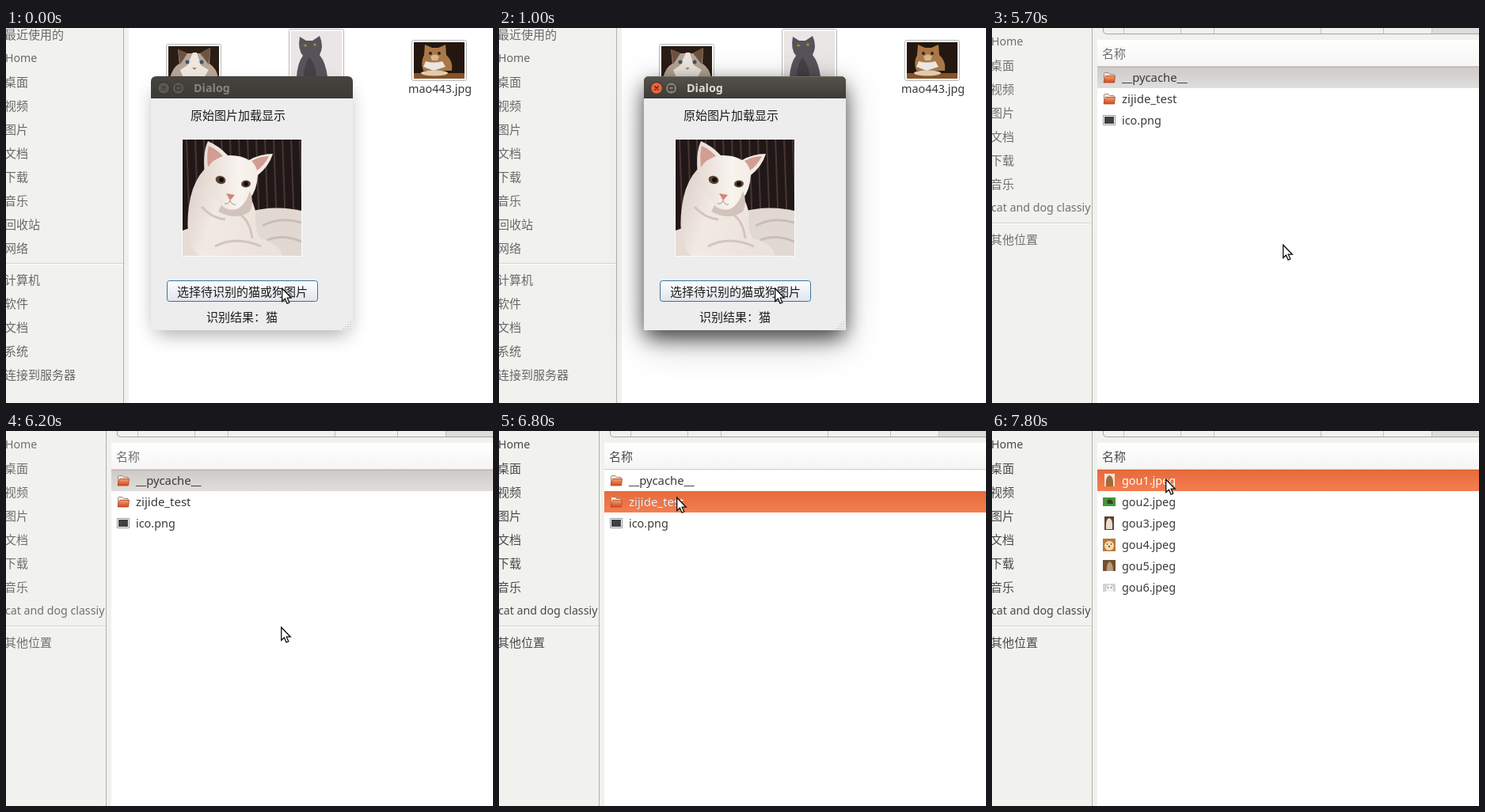
These frames come from a looping animation (615x474 px, 8000 ms). An HTML page:

```html
<!DOCTYPE html>
<html lang="zh-CN">
<head>
<meta charset="utf-8">
<title>Dialog</title>
<style>
html, body { margin: 0; width: 100%; height: 100%; overflow: hidden; background: #fff; }
svg { display: block; width: 615px; height: 474px; }
text {
  font: 14.4px "Noto Sans", "Noto Sans CJK SC", "Noto Sans CJK", sans-serif;
  fill: #3a3a3a;
}
.zh text, text.zh { font-size: 15px; }
.zh .la { font-size: 14.2px; }
.dim text { fill: #686868; }
.ink text { fill: #1c1c1c; }
text.title { font-weight: 700; font-size: 14.3px; }
.near { filter: blur(13px); }
.far { filter: blur(25px); }

.t { animation: 8s step-end infinite; }
.desktop { animation-name: desktop; }
.chooser { animation-name: chooser; }
.focus { animation-name: focus; }
.depth { animation-name: depth; }
.answer { animation-name: answer; }
.tone text { animation: tone 8s step-end infinite; }
.root { animation-name: root; }
.idle { animation-name: idle; }
.pick { animation-name: pick; }
.hot { animation-name: hot; }
.pets { animation-name: pets; }
.dogs { animation-name: dogs; }
.cursor { animation-name: cursor; }

@keyframes desktop { 0% { opacity: 1 } 71.25%, 100% { opacity: 0 } }
@keyframes chooser { 0% { opacity: 0 } 71.25%, 100% { opacity: 1 } }
@keyframes focus { 0% { opacity: 0 } 11.25%, 100% { opacity: 1 } }
@keyframes depth { 0% { opacity: 0 } 11.25% { opacity: .5 } 12.5%, 100% { opacity: 1 } }
@keyframes answer { 0% { opacity: 1 } 70%, 100% { opacity: 0 } }
@keyframes tone { 0% { fill: #707070 } 85%, 100% { fill: #4a4a4a } }
@keyframes root { 0% { opacity: 1 } 86.25%, 100% { opacity: 0 } }
@keyframes idle { 0% { opacity: 1 } 85%, 100% { opacity: 0 } }
@keyframes pick { 0% { opacity: 0 } 85% { opacity: 1 } 86.25%, 100% { opacity: 0 } }
@keyframes hot { 0% { opacity: 0 } 86.25%, 100% { opacity: 1 } }
@keyframes pets { 0% { opacity: 0 } 86.25% { opacity: 1 } 97.5%, 100% { opacity: 0 } }
@keyframes dogs { 0% { opacity: 0 } 97.5%, 100% { opacity: 1 } }
@keyframes cursor {
  0% { transform: translate(348px, 328px) }
  70% { transform: translate(359px, 306px) }
  71.25% { transform: translate(367px, 273px) }
  76.25% { transform: translate(361px, 265px) }
  77.5% { transform: translate(347px, 247px) }
  78.75% { transform: translate(325px, 217px) }
  80% { transform: translate(298px, 181px) }
  81.25% { transform: translate(266px, 139px) }
  82.5% { transform: translate(238px, 101px) }
  83.75% { transform: translate(224px, 83px) }
  91.25% { transform: translate(223px, 77px) }
  92.5% { transform: translate(221px, 68px) }
  93.75%, 100% { transform: translate(219px, 60px) }
}
</style>
</head>
<body>
<svg viewBox="0 0 615 474">
  <defs>
    <linearGradient id="bar" x2="0" y2="1"><stop stop-color="#55534a"/><stop offset="1" stop-color="#3c3b37"/></linearGradient>
    <linearGradient id="barOff" x2="0" y2="1"><stop stop-color="#45443f"/><stop offset="1" stop-color="#3b3a36"/></linearGradient>
    <linearGradient id="btn" x2="0" y2="1"><stop stop-color="#fdfdfe"/><stop offset="1" stop-color="#dfe5ec"/></linearGradient>
    <linearGradient id="grey" x2="0" y2="1"><stop stop-color="#cdcac7"/><stop offset="1" stop-color="#e0dedc"/></linearGradient>
    <linearGradient id="orange" x2="0" y2="1"><stop stop-color="#e76a3a"/><stop offset="1" stop-color="#f37e51"/></linearGradient>
    <linearGradient id="head" x2="0" y2="1"><stop stop-color="#fff"/><stop offset="1" stop-color="#f6f5f4"/></linearGradient>
    <linearGradient id="fold" x2="0" y2="1"><stop stop-color="#f0a070"/><stop offset="1" stop-color="#d5481f"/></linearGradient>
    <linearGradient id="fur" x2="1" y2=".3"><stop stop-color="#d9cdc6"/><stop offset=".4" stop-color="#f1e9e3"/><stop offset="1" stop-color="#ece2dc"/></linearGradient>
    <linearGradient id="face"><stop stop-color="#e6dad3"/><stop offset=".5" stop-color="#f8f3ee"/><stop offset="1" stop-color="#f1e7e1"/></linearGradient>
    <pattern id="bars" width="11" height="150" patternUnits="userSpaceOnUse" patternTransform="translate(225 141) rotate(-2)">
      <path d="M3 0V150" stroke="#5e4b47" stroke-width="1.200"/>
    </pattern>
    <clipPath id="photo"><path d="M223 141h150v147H223z"/></clipPath>
    <g id="folder">
      <path d="M1.500 13V2.500q0-1 1-1H7l1.500 2H14V13z" fill="#f2e9e2" stroke="#a58472"/>
      <path d="M3.500 5.500h12l-1 8.500H1z" fill="url(#fold)" stroke="#b5451f" stroke-width=".8"/>
    </g>
  </defs>

  <g class="t desktop">
    <path d="M0 0h615v474H0z" fill="#fff"/>
    <path d="M0 0h155v474H0z" fill="#f1f1ee"/>
    <path d="M148.500 0V474" stroke="#b0b0ad"/>
    <path d="M0 297.500H148" stroke="#d3d3d0"/><path d="M0 298.500H148" stroke="#fff"/>
    <g class="zh dim">
      <text x="-2" y="13.500">最近使用的</text>
      <text x="-1" y="43" class="la">Home</text>
      <text x="-2" y="74">桌面</text>
      <text x="-2" y="104">视频</text>
      <text x="-2" y="134">图片</text>
      <text x="-2" y="164">文档</text>
      <text x="-2" y="194">下载</text>
      <text x="-2" y="224">音乐</text>
      <text x="-2" y="254">回收站</text>
      <text x="-2" y="284">网络</text>
      <text x="-2" y="324">计算机</text>
      <text x="-2" y="354">软件</text>
      <text x="-2" y="384">文档</text>
      <text x="-2" y="414">系统</text>
      <text x="-2" y="444">连接到服务器</text>
    </g>

    <g fill="#fff" stroke="#b9b9b9">
      <rect x="202.500" y="20.500" width="69" height="52" rx="2"/>
      <rect x="357.500" y="1.500" width="69" height="70" rx="2"/>
      <rect x="512.500" y="15.500" width="69" height="51" rx="2"/>
    </g>
    <path d="M205 23h64v40h-64z" fill="#2a1d16"/>
    <path d="M207 63q4-14 12-18l-2-18 12 5h16l13-7-1 20q9 6 11 18z" fill="#b7a595"/>
    <path d="M217 27l12 5-9 14zM258 25l-13 7 11 14z" fill="#6f5341"/>
    <path d="M236 31h5l5 16 10 6-6 10h-26l-4-10 9-6z" fill="#eee6df"/>
    <circle cx="229" cy="43" r="2.500" fill="#3f5568"/><circle cx="247" cy="43" r="2.500" fill="#3f5568"/>
    <path d="M235 50h6l-3 3z" fill="#b9817a"/>
    <path d="M360 4h64v58h-64z" fill="#e9e6e5"/>
    <path d="M367 62q1-18 8-27-7-8-4-24l8 5h8l9-6q6 13 0 24 8 10 10 28z" fill="#56545a"/>
    <path d="M376 62q0-15 7-25 9 10 9 25z" fill="#444247"/>
    <circle cx="378" cy="22" r="1.800" fill="#a8853d"/><circle cx="390" cy="21" r="1.800" fill="#a8853d"/>
    <path d="M515 18h64v46h-64z" fill="#23170f"/>
    <path d="M527 54q-4-10 1-20l1-13 9 4h8l9-4 1 13q9 8 7 20z" fill="#a97847"/>
    <path d="M530 42q10 3 21 0l4 7-15 5-13-5z" fill="#ebe6e0"/>
    <path d="M536 36q6-5 11 0l-2 5h-7z" fill="#d5b68e"/>
    <circle cx="536" cy="32" r="2" fill="#3b2312"/><circle cx="547" cy="32" r="2" fill="#3b2312"/>
    <path d="M515 57h64v7h-64z" fill="#855329"/>
    <ellipse cx="541" cy="57" rx="17" ry="3.500" fill="#decbb2"/>
    <text x="508" y="82">mao443.jpg</text>

    <rect class="near" x="189" y="78" width="243" height="308" rx="6" opacity=".36"/>
    <g class="t depth">
      <rect class="near" x="184" y="72" width="253" height="320" rx="6" opacity=".5"/>
      <rect class="far" x="184" y="72" width="253" height="326" rx="6" opacity=".22"/>
    </g>
    <path d="M183 89h255v293H183z" fill="#ededed"/>
    <path d="M183 89V68q0-7 7-7h241q7 0 7 7v21z" fill="url(#barOff)"/>
    <g fill="#5a5851" stroke="#33322e">
      <circle cx="199" cy="76" r="7.500"/><circle cx="217.500" cy="76" r="7.500"/>
    </g>
    <path d="M196.500 73.500l5 5m0-5l-5 5M214.500 73.500h6v5h-6z" fill="none" stroke="#373630" stroke-width="1.300"/>
    <text x="237" y="81" class="title" style="fill:#86837a">Dialog</text>
    <g class="t focus">
      <path d="M183 89V68q0-7 7-7h241q7 0 7 7v21z" fill="url(#bar)"/>
      <path d="M188 61.500H433" stroke="#6b695f"/>
      <circle cx="199" cy="76" r="7.500" fill="#ea6238" stroke="#33322e"/>
      <circle cx="217.500" cy="76" r="7.500" fill="#7b796f" stroke="#33322e"/>
      <path d="M196.500 73.500l5 5m0-5l-5 5M214.500 73.500h6v5h-6z" fill="none" stroke="#3c2b22" stroke-width="1.300"/>
      <text x="237" y="81" class="title" style="fill:#dfdbd2">Dialog</text>
    </g>

    <path d="M222 140h152v149H222z" fill="#fbfbfb"/>
    <g clip-path="url(#photo)">
      <path d="M223 141h150v147H223z" fill="#211717"/>
      <path d="M223 141h150v147H223z" fill="url(#bars)"/>
      <path d="M302 233q38-10 71-2v57h-80z" fill="#e2d8d2"/>
      <path d="M223 256q10-5 20-2v34h-20z" fill="#e6dcd5"/>
      <path d="M251 178q-13 14-18 36-5 24-3 44 2 20 13 30h106q-4-16-28-22-6-8-6-22 2-16-7-30z" fill="url(#fur)"/>
      <path d="M251 184q-3-26 4-41 14 6 25 18 16-1 27 6 14-8 30-8-5 16-19 27-1 18-10 30-11 14-24 13-15-5-22-20-9-12-11-25z" fill="url(#face)"/>
      <path d="M255 176q-2-17 1-27 11 5 18 13-13 4-19 14zM310 168q10-6 22-6-6 12-15 18-2-7-7-12z" fill="#d39d92"/>
      <path d="M247 226q12 14 30 16M296 236q12 8 15 30M264 276q26-14 58 0" fill="none" stroke="#d3c5be" stroke-width="3"/>
      <path d="M308 206q-4 16-16 23-12 3-20-5l-4 8q22 12 40 0 6-12 0-26z" fill="#d2c3bc"/>
      <ellipse cx="271" cy="192" rx="6.500" ry="5" fill="#5b4434" transform="rotate(18 271 192)"/>
      <ellipse cx="303" cy="197" rx="6" ry="4.500" fill="#5b4434" transform="rotate(-6 303 197)"/>
      <circle cx="272" cy="192" r="3" fill="#140e0b"/><circle cx="303" cy="197" r="3" fill="#140e0b"/>
      <path d="M278 209l11 2-6 7z" fill="#d0867e"/>
      <path d="M283 218q-2 5-7 4m7-4q2 6 7 5" fill="none" stroke="#b98d84"/>
      <path d="M324 250q22-12 49-4M330 268q20-8 43 2" fill="none" stroke="#cabdb7" stroke-width="3"/>
    </g>
    <rect x="203.500" y="319.500" width="190" height="26" rx="3" fill="url(#btn)" stroke="#38759a"/>
    <g class="zh ink">
      <text x="233" y="115.500">原始图片加载显示</text>
      <text x="216" y="338.500">选择待识别的猫或狗图片</text>
      <text x="253" y="370.500">识别结果：</text>
      <text x="328" y="370.500" class="t answer">猫</text>
    </g>
    <path d="M435 371v10M432 374v7M429 377v4M426 380v1" stroke="#aaa" stroke-dasharray="1 2"/>
  </g>

  <g class="t chooser">
    <path d="M0 0h615v474H0z" fill="#fff"/>
    <path d="M0 0h133v474H0zM133 0h482v15H133z" fill="#f1f1ee"/>
    <path d="M126.500 0V474" stroke="#b0b0ad"/>
    <path d="M0 246.500H126" stroke="#d3d3d0"/><path d="M0 247.500H126" stroke="#fff"/>
    <path d="M555 0h60v7h-60z" fill="#dddcda"/>
    <path d="M140.500 0v3q0 4.500 5 4.500H615" fill="none" stroke="#a9a6a2"/>
    <path d="M166.500 0v7M238.500 0v7M280.500 0v7M415.500 0v7M494.500 0v7M555.500 0v7" stroke="#c3c0bd"/>
    <path d="M133 15h482v33H133z" fill="url(#head)"/>
    <path d="M133 48.500H615" stroke="#d0cdca"/>
    <g class="zh tone">
      <text x="-1" y="22" class="la">Home</text>
      <text x="-2" y="53">桌面</text>
      <text x="-2" y="83">视频</text>
      <text x="-2" y="113">图片</text>
      <text x="-2" y="143">文档</text>
      <text x="-2" y="173">下载</text>
      <text x="-2" y="203">音乐</text>
      <text x="-1" y="232" class="la">cat and dog classiy</text>
      <text x="-2" y="273">其他位置</text>
      <text x="139" y="38">名称</text>
    </g>

    <g class="t root">
      <g class="t idle">
        <path d="M133 49h482v27H133z" fill="url(#grey)"/>
        <path d="M133 49.500H615" stroke="#bbb7b3"/>
      </g>
      <g class="t pick">
        <path d="M133 76h482v27H133z" fill="url(#orange)"/>
      </g>
      <use href="#folder" x="140" y="55"/>
      <use href="#folder" x="140" y="82"/>
      <path d="M140.500 110.500h15v12h-15z" fill="#fff" stroke="#999"/><path d="M142 112h12v9h-12z" fill="#3f4245"/>
      <text x="164" y="68" style="font-size:14.8px">__pycache__</text>
      <text x="164" y="95" style="font-size:15px">zijide_test</text>
      <text x="164" y="95" style="font-size:15px;fill:#fff" class="t pick">zijide_test</text>
      <text x="164" y="122">ico.png</text>
    </g>

    <g class="t hot">
      <path d="M133 49h482v27H133z" fill="url(#orange)"/>
      <path d="M133 49.500H615" stroke="#d9602f"/>
    </g>
    <g class="t pets">
      <use href="#folder" x="140" y="55"/>
      <use href="#folder" x="140" y="82"/>
      <text x="164" y="68" style="fill:#fff">gou</text>
      <text x="164" y="95">mao</text>
    </g>
    <g class="t dogs">
      <path d="M142 54h13v16h-13z" fill="#eee3d2"/><path d="M144 70q-1-12 4-14 6 1 5 14z" fill="#a06a3a"/>
      <path d="M140 84h16v11h-16z" fill="#3f9a35"/><path d="M145 89l3-3 4 2 1 4h-7z" fill="#4b3828"/>
      <path d="M142 108h12v17h-12z" fill="#5b4136"/><path d="M144 124q-1-13 4-14 5 1 4 14z" fill="#ecdccd"/>
      <path d="M140 136h16v16h-16z" fill="#b9793a"/><circle cx="148" cy="145" r="6" fill="#f2d9ac"/><path d="M145 143h1m4 0h1m-4 3h2" stroke="#4a2d18" stroke-width="1.500"/>
      <path d="M140 163h16v14h-16z" fill="#74502f"/><path d="M145 177q-1-10 4-12 4 3 4 12z" fill="#b89a82"/>
      <path d="M140 193h16v10h-16z" fill="#cdd5da"/><path d="M144 203q0-8 4-9 5 1 5 9z" fill="#f6f2ed"/><path d="M146 198h1m3 0h1" stroke="#5a4a42" stroke-width="1.500"/>
      <text x="164" y="68" style="fill:#fff">gou1.jpeg</text>
      <text x="164" y="95">gou2.jpeg</text>
      <text x="164" y="122">gou3.jpeg</text>
      <text x="164" y="149">gou4.jpeg</text>
      <text x="164" y="176">gou5.jpeg</text>
      <text x="164" y="203">gou6.jpeg</text>
    </g>
  </g>

  <g class="t cursor">
    <path d="M.7 1.200V17.500l3.700-3.300 2.600 6 2.800-1.200-2.600-5.800h5z" fill="#fff" stroke="#111" stroke-width="1.300"/>
  </g>
</svg>
</body>
</html>
```
